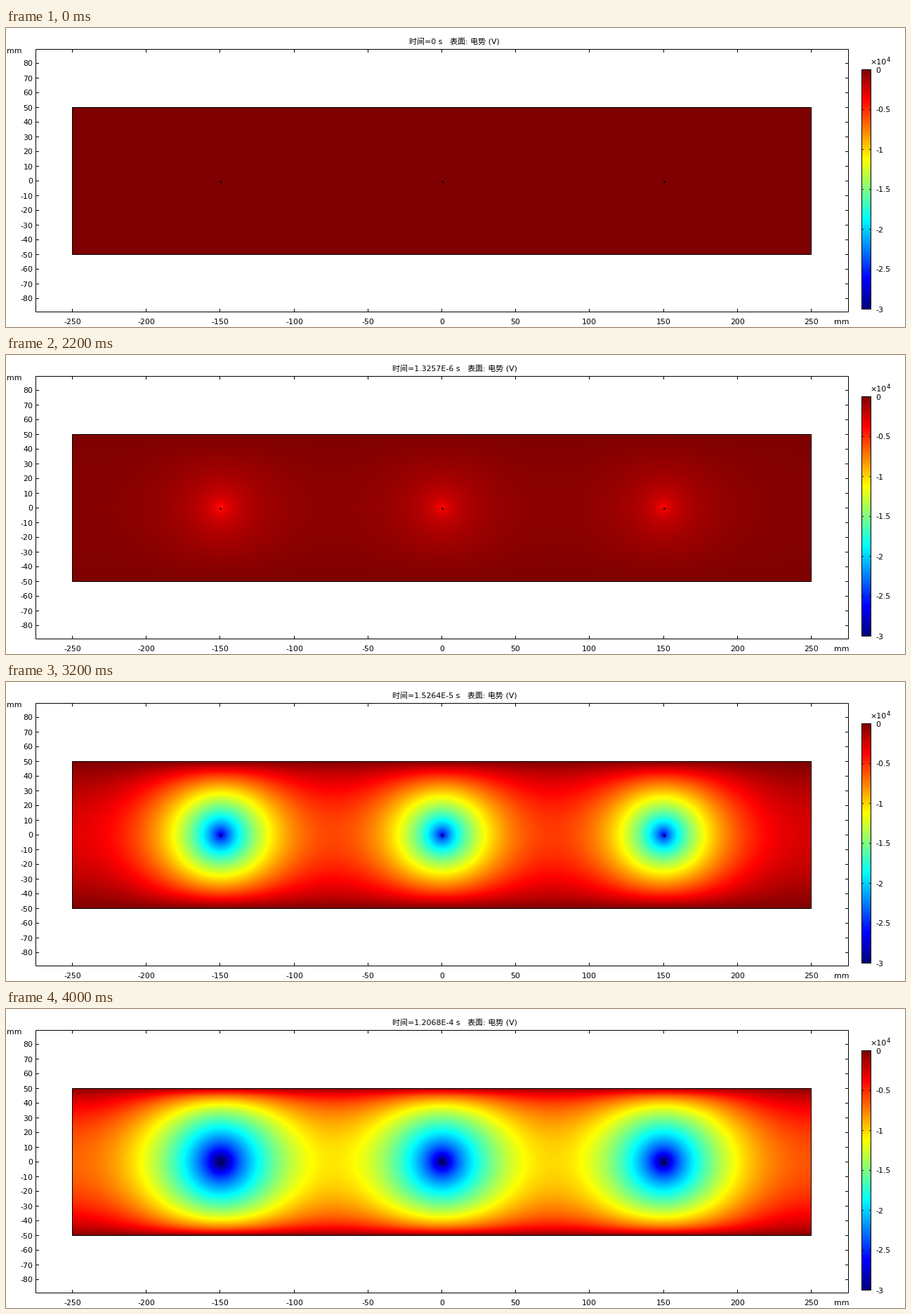
Animation of 1280x427 px, one loop 4.2 s. Source, as a matplotlib script:

```python
import numpy as np
import matplotlib.pyplot as plt
from matplotlib.animation import FuncAnimation
from matplotlib.colors import LinearSegmentedColormap
from matplotlib.patches import Rectangle

W, H, DPI = 1280, 427, 64
FRAMES, STEP_MS = 21, 200
SCALE, CX, CY = 2.104, 620.5, 218.5      # px per mm, position of the origin
WIRES = (-150, 0, 150)
BOX = (42.5, 1199.5, 30.5, 405.5)
BAR = (1218.5, 1231.5, 59.5, 401.5)

# Lines sit on pixel centres already, so snapping is not wanted
plt.rcParams["path.snap"] = False
plt.rcParams["font.family"] = ["DejaVu Sans", "Noto Sans CJK JP"]
RAINBOW = LinearSegmentedColormap.from_list("rainbow", [
    (0, (0, 0, .5)), (.125, (0, 0, 1)), (.375, (0, 1, 1)),
    (.625, (1, 1, 0)), (.875, (1, 0, 0)), (1, (.5, 0, 0))], N=512)

# Key frames: simulated time, field strength, saturation level and exponent
KEYS = [1, 7, 11, 13, 15, 17, 20]
TIMES = [1e-8, 2.0236e-7, 1.3257e-6, 2.8118e-6, 8.6851e-6, 2.6827e-5, 1.2068e-4]
GAINS = [.001, .02, .105, .31, 1.15, 2.2, 2.3]
LIMITS = [3, 3, 3, 2.5, 2.6, 3.2, 4]
POWERS = [1, 1, 1, 1, 1, 1, .7]

fig = plt.figure(figsize=(W / DPI, H / DPI), dpi=DPI, facecolor="white")
ax = fig.add_axes([0, 0, 1, 1])
ax.axis("off")


def px(mm):
    return np.floor(CX + SCALE * mm) + .5


def py(mm):
    return np.floor(CY - SCALE * mm) + .5


def label(x, y, s, ha="center", size=11):
    return ax.text(x, y, s, ha=ha, va="baseline", fontsize=size * 72 / DPI,
                   color="black")


def line(xs, ys):
    ax.plot(xs, ys, color="black", lw=72 / DPI, solid_capstyle="butt", zorder=4)


def outline(x0, x1, y0, y1):
    ax.add_patch(Rectangle((x0, y0), x1 - x0, y1 - y0, fill=False,
                           ec="black", lw=72 / DPI, zorder=4))


def wire_potential(x, y):
    """Line charge between two grounded plates at y = -50 and y = 50."""
    a, b = np.cosh(np.pi * x / 100), np.cos(np.pi * y / 100)
    return .5 * np.log((a + b) / (a - b + .0008))


def key_log(values, i):
    return np.exp(np.interp(i, KEYS, np.log(values)))


gx, gy = np.meshgrid(np.linspace(-250, 250, 1052), np.linspace(50, -50, 210))
base = sum(wire_potential(gx - w, gy) for w in (-350,) + WIRES + (350,))
base *= 1 + .15 / (1 + np.exp((gx + 75) / 25))     # the left wire is stronger
base = np.maximum(base, 0)
rim = np.abs(gy / 50)
wall = rim ** 2 * (1 - rim ** 8) / (1 + np.exp((np.abs(gx) - 200) / 12))


def field(i):
    if i == 0:
        return np.zeros_like(base)
    gain = key_log(GAINS, i)
    limit, power = np.interp(i, KEYS, LIMITS), np.interp(i, KEYS, POWERS)
    v = limit * (1 - np.exp(-gain * base ** power / limit))
    return -v - .15 * np.clip((i - 15) / 2, 0, 1) * wall


def time_text(i):
    if i == 0:
        return "0"
    mantissa, power = f"{key_log(TIMES, i):.4E}".split("E")
    return f"{mantissa.rstrip('0').rstrip('.')}E{int(power)}"


def draw_axes():
    x0, x1, y0, y1 = BOX
    outline(*BOX)
    for v in range(-250, 251, 50):
        x = px(v)
        line([x, x], [y1, y1 - 4.5])
        line([x, x], [y0, y0 + 4.5])
        label(x, 423, str(v))
    for v in range(-80, 81, 10):
        y = py(v)
        line([x0, x0 + 4.5], [y, y])
        line([x1, x1 - 4.5], [y, y])
        label(38.5, y + 4, str(v), "right")
    label(1.5, 36, "mm", "left")
    label(1201, 423, "mm", "right")


def draw_colorbar():
    x0, x1, y0, y1 = BAR
    ramp = np.linspace(0, -3, 342)[:, None]
    ax.imshow(ramp, cmap=RAINBOW, vmin=-3, vmax=0, aspect="auto",
              extent=(x0, x1, y1, y0), zorder=2)
    outline(*BAR)
    for n in range(7):
        y = y0 + 57 * n
        line([x0, x0 + 2.5], [y, y])
        line([x1, x1 - 2.5], [y, y])
        label(1238.5, y + 4, f"{-n / 2:g}" if n else "0", "left")
    label(1230.5, 52, "×10", "left")
    label(1254, 48, "4", "left", 8.5)


draw_axes()
draw_colorbar()
plate = (px(-250), px(250), py(50), py(-50))
image = ax.imshow(field(0), cmap=RAINBOW, vmin=-3, vmax=0, aspect="auto",
                  extent=(plate[0], plate[1], plate[3], plate[2]), zorder=2)
outline(*plate)
for w in WIRES:
    ax.plot(px(w), CY, "+", color="black", ms=4 * 72 / DPI,
            mew=1.2 * 72 / DPI, zorder=5)
title = label(638.5, 23, "")
ax.set_xlim(0, W)
ax.set_ylim(H, 0)


def update(i):
    image.set_data(field(i))
    title.set_text(f"时间={time_text(i)} s   表面: 电势 (V)")
    return image, title


anim = FuncAnimation(fig, update, frames=FRAMES, interval=STEP_MS,
                     repeat=True, repeat_delay=0, blit=False)
plt.show()
```
